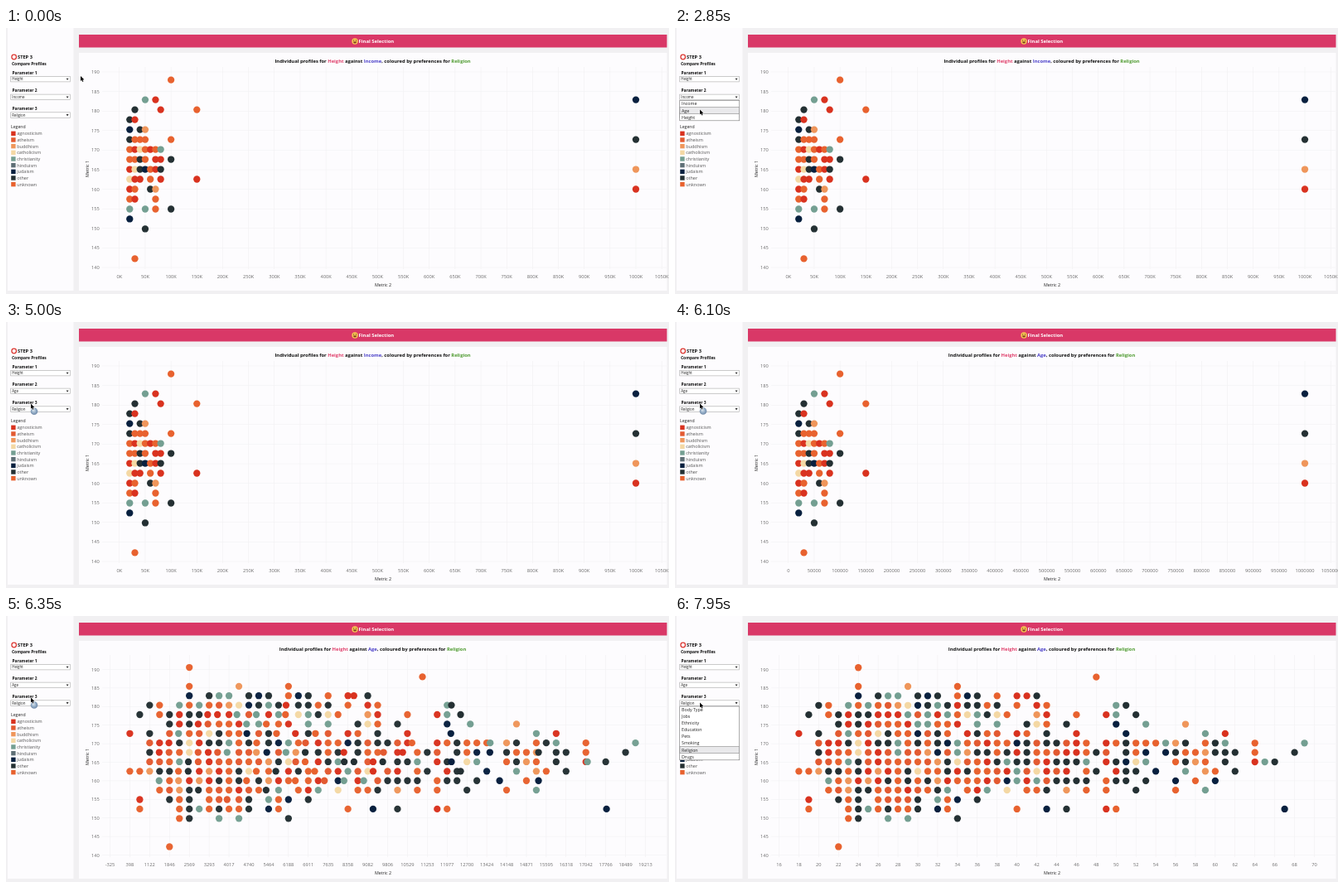
An HTML page with a canvas for the animation above (8000 ms loop, 800 by 321 pixels).

```html
<!DOCTYPE html>
<html lang="en">
<head>
<meta charset="utf-8">
<title>Compare profiles</title>
<style>
html, body { margin: 0; width: 100%; height: 100%; overflow: hidden; background: #f1f0f2; }
canvas { display: block; width: 800px; height: 321px; }
</style>
</head>
<body>
<canvas id="stage"></canvas>
<script>
const W = 800, H = 321, LOOP = 8000, STEP = 50;
const MORPH_AT = 6100, MORPH_MS = 300.3;
const FONT = '"Open Sans", "Noto Sans", sans-serif';
const canvas = document.getElementById('stage');
const ctx = canvas.getContext('2d');
const dpr = window.devicePixelRatio || 1;
canvas.width = W * dpr;
canvas.height = H * dpr;

const LEGEND = [
  ['a', 'agnosticism', '#d9321f'], ['t', 'atheism', '#e35a31'], ['b', 'buddhism', '#ef965b'],
  ['k', 'catholicism', '#f4d8a4'], ['c', 'christianity', '#749f92'], ['h', 'hinduism', '#5f6f76'],
  ['j', 'judaism', '#08203f'], ['o', 'other', '#243033'], ['u', 'unknown', '#e8622f'],
];
const COLOR = Object.fromEntries(LEGEND.map(([key, , color]) => [key, color]));

// Height in inches: [religion + income in K, religion + age or age runs].
// A capital marks a profile that is also in the income view.
const ROWS = {
  75: ['', 'u24'],
  74: ['u100', 'U48'],
  73: ['', 'u24 b29 u34'],
  72: ['c50 a70 j1000', 'j24 o26 c27 c28 o30 j31 o32 u34 j35 o36 u38 a40 A41 o42'],
  71: ['o30 a80 u150', 'o20 u21 c23 u24 c25 26-28 k29 30-35 o36 u37 o38 u40 a42 u43 c50 O51'],
  70: ['o20 a30', 'o19 u21 o22 a23 24-36 o37 k38 u39 b42 a43 u46 a49 c50 O52'],
  69: ['j20 o40 b50', 'o22 a23 o24 25-34 c36 c38 o41 k42 u43 o45 j50 C53 b57'],
  68: ['o20 u30 u40 u50 u100 o1000', 'a18 o20 22-33 35-38 a40 u41 o43 a46 J51 c59 a61'],
  67: ['u20 a30 k40 u50 a60 u70 c80', '20-47 a49 u50 o51 u52 u53 u54 C55 b56 o57 u59 o60 c61 u64 c69'],
  66: ['u20 u30 o40 u50 a70 a80 o100', '20-49 o51 u52 j53 J55 o56 u57 u58 b59 O60 o61 o62 u64 o68'],
  65: ['a20 k30 o40 j50 u60 a70 o80 b1000', '20-47 a49 o50 J51 k52 c53 u56 o57 b58 u59 o61 a64 C65 o66'],
  64: ['k20 a30 a40 u60 a80 a150', 'u18 u19 20-45 u47 o48 a50 o51 O52 j54 c57 b59 u60 o62'],
  63: ['a20 u30 o60 b70 a1000', '21-43 o44 o45 o46 o47 u49 o50 o51 o53 J56 u58 J60'],
  62: ['u20 a30 u70', 'u21 22-33 35-37 k39 u41 u42 o43 b45 u47 u49 o52 u56 c59'],
  61: ['c20 c50 u70 o100', 'a19 o22 u23 o24 26-30 c32 u33 j34 o36'],
  60: ['j20', 'u19 u23 o24 c25 u26 o27 u28 u29 o30 j32 u33 u40 J43 o45 a49 u50 J67'],
  59: ['o50', 'u23 o24 c27 c29 o34'],
  56: ['u30', 'u22'],
};
const LISTS = {
  2: { top: 87.5, items: ['Income', 'Age', 'Height'] },
  3: { top: 109, items: ['Body Type', 'Jobs', 'Ethnicity', 'Education', 'Pets', 'Smoking', 'Religion', 'Drugs'] },
};
const PATH = [
  [0, 90, 58], [150, 90, 58], [350, 31, 91], [600, 31, 91], [1000, 32, 83.5],
  [2450, 32, 83.5], [2900, 30, 99], [6500, 30, 98.5], [6900, 30, 104.5], [LOOP, 30, 104.5],
];

const lerp = (a, b, k) => a + (b - a) * k;
const ease = u => u < .5 ? 4 * u ** 3 : 1 - 4 * (1 - u) ** 3;
const incomeX = k => 136.8 + k * .6232;
const incomeY = cm => 289 - (cm - 140) * 4.72;
const ageX = age => 125.5 + (age - 16) * 11.963;
const ageY = cm => 288.5 - (cm - 140) * 4.48;

let seed = 41;
function rnd() {
  seed = (seed * 1664525 + 1013904223) % 4294967296;
  return seed / 4294967296;
}

function pickReligion(age) {
  const pool = age < 38 ? 'uuuuuuttttaaaaoooocckjb' : 'uuuttaaaooooooojjcckb';
  return pool[Math.floor(rnd() * pool.length)];
}

function parse(text) {
  const out = [];
  for (const [, key, from, to] of text.matchAll(/([a-z]?)(\d+)(?:-(\d+))?/gi))
    for (let n = +from; n <= +(to || from); n++) out.push({ key, n });
  return out;
}

const incomeDots = [], ageDots = [];
for (const inch of Object.keys(ROWS)) {
  const cm = inch * 2.54;
  const [incomes, ages] = ROWS[inch].map(parse);
  for (const { key, n } of incomes)
    incomeDots.push({ x: incomeX(n), y: incomeY(cm), color: COLOR[key] });
  for (const { key, n } of ages) {
    const known = key ? key !== key.toLowerCase() : rnd() < .3;
    const near = incomes.filter(d => d.n < 1000);
    const start = known && near.length ? near[Math.floor(rnd() * near.length)] : null;
    ageDots.push({
      x: ageX(n), y: ageY(cm), oldY: incomeY(cm),
      oldX: start && incomeX(start.n),
      color: COLOR[key.toLowerCase() || pickReligion(n)],
    });
  }
}

function rect(x, y, w, h, fill, stroke) {
  if (fill) { ctx.fillStyle = fill; ctx.fillRect(x, y, w, h); }
  if (stroke) { ctx.strokeStyle = stroke; ctx.lineWidth = .6; ctx.strokeRect(x, y, w, h); }
}

function disc(x, y, r, fill) {
  ctx.fillStyle = fill;
  ctx.beginPath();
  ctx.arc(x, y, r, 0, Math.PI * 2);
  ctx.fill();
}

function text(str, x, y, size, color, { bold = false, align = 'left' } = {}) {
  ctx.font = `${bold ? 'bold ' : ''}${size}px ${FONT}`;
  ctx.fillStyle = color;
  ctx.textAlign = align;
  ctx.textBaseline = 'alphabetic';
  ctx.fillText(str, x, y + size * .36);
}

function poly(points, fill, stroke) {
  ctx.beginPath();
  points.forEach(([x, y]) => ctx.lineTo(x, y));
  ctx.closePath();
  if (stroke) { ctx.strokeStyle = stroke; ctx.lineWidth = 1; ctx.stroke(); }
  ctx.fillStyle = fill;
  ctx.fill();
}

function drawBanner() {
  rect(88, 8, 709.5, 15.5, '#d93867');
  disc(421, 16, 3.7, '#f6c552');
  disc(419.6, 14.9, .6, '#6b4320');
  disc(422.4, 14.9, .6, '#6b4320');
  ctx.fillStyle = '#7a3b1d';
  ctx.beginPath();
  ctx.arc(421, 16.5, 2, 0, Math.PI);
  ctx.fill();
  text('Final Selection', 425.5, 16, 5.9, '#fff', { bold: true });
}

function drawTitle(metric) {
  const parts = [
    ['Individual profiles for ', '#111'], ['Height', '#e0406c'], [' against ', '#111'],
    [metric, '#4a3fc8'], [', coloured by preferences for ', '#111'], ['Religion', '#4d9a2e'],
  ];
  ctx.font = `bold 5.8px ${FONT}`;
  const widths = parts.map(p => ctx.measureText(p[0]).width);
  let x = 442.5 - widths.reduce((a, b) => a + b) / 2;
  parts.forEach(([str, color], i) => {
    text(str, x, 40.3, 5.8, color, { bold: true });
    x += widths[i];
  });
}

function drawAxes(t, e) {
  const morphed = t > MORPH_AT;
  const label = { align: 'center' };
  const xs = [], ys = [];
  if (morphed) {
    for (let age = 16; age <= 70; age += 2) {
      const x = ageX(age), before = (x - 136.8) / .6232 * 1000;
      xs.push([x, Math.round(lerp(before, age, e))]);
    }
  } else {
    for (let k = 0; k <= 1050; k += 50)
      xs.push([incomeX(k), t < MORPH_AT ? k + 'K' : k * 1000]);
  }
  for (let cm = 140; cm <= 190; cm += 5) {
    const y = morphed ? ageY(cm) : incomeY(cm);
    const before = 140 + (289 - y) / 4.72;
    ys.push([y, morphed ? Math.round(lerp(before, cm, e)) : cm]);
  }
  for (const [x, str] of xs) {
    rect(x - .25, 47, .5, 244, '#efeef0');
    text(String(str), x, 299.7, 5.7, '#6c6c6c', label);
  }
  for (const [y, str] of ys) {
    rect(116, y - .25, 681, .5, '#efeef0');
    text(String(str), 112.8, y, 5.7, '#6c6c6c', { align: 'right' });
  }
  text('Metric 2', 455, 310.5, 5.3, '#222', label);
  ctx.save();
  ctx.translate(98, 170);
  ctx.rotate(-Math.PI / 2);
  text('Metric 1', 0, 0, 5.3, '#222', label);
  ctx.restore();
}

function drawDots(t, e) {
  const r = 4.15;
  if (t <= MORPH_AT) {
    incomeDots.forEach(d => disc(d.x, d.y, r, d.color));
    return;
  }
  for (const d of ageDots) {
    const y = lerp(d.oldY, d.y, e);
    ctx.globalAlpha = d.oldX === null ? e : 1;
    disc(d.oldX === null ? d.x : lerp(d.oldX, d.x, e), y, r, d.color);
  }
  ctx.globalAlpha = 1;
}

function drawSelect(index, value, hot) {
  const y = 58.4 + (index - 1) * 21.7;
  text('Parameter ' + index, 7.5, y - 4.5, 4.9, '#111', { bold: true });
  rect(5.7, y, 71.8, 6.5, '#fff', hot ? '#444' : '#aaa');
  text(value, 7.2, y + 3.3, 4.4, '#222');
  poly([[72.6, y + 2.3], [75.6, y + 2.3], [74.1, y + 4.6]], '#333');
}

function drawList({ top, items }, active) {
  const rowH = 8.1;
  rect(5.7, top, 72, items.length * rowH, '#fff', '#777');
  items.forEach((item, i) => {
    const y = top + i * rowH;
    if (i === active) rect(5.9, y, 71.6, rowH, '#e9e9eb', '#8a8a8a');
    text(item, 8, y + rowH / 2, 5.3, '#222');
  });
}

function drawSidebar(t, tipY) {
  rect(2, 0, 79.5, 317, '#fdfcfe');
  ctx.strokeStyle = '#dc3b35';
  ctx.lineWidth = 1.3;
  ctx.beginPath();
  ctx.arc(9.7, 35, 2.8, 0, Math.PI * 2);
  ctx.stroke();
  text('STEP 3', 14, 35, 5.7, '#111', { bold: true });
  text('Compare Profiles', 7, 43, 4.9, '#111', { bold: true });

  const secondOpen = t >= 2300 && t < 4700;
  const thirdOpen = t >= 7400;
  drawSelect(1, 'Height');
  drawSelect(2, t < 4700 ? 'Income' : 'Age', t >= 600 && t < 2300);
  drawSelect(3, 'Religion', t >= 6900 && !thirdOpen);

  text('Legend', 6, 119.2, 5.2, '#222');
  LEGEND.forEach(([, name, color], i) => {
    const y = 127.3 + i * 7.67;
    rect(6.2, y - 2.7, 5.4, 5.4, color);
    text(name, 13.2, y, 5.5, '#555');
  });
  if (secondOpen) drawList(LISTS[2], tipY > 95 ? 1 : 0);
  if (thirdOpen) drawList(LISTS[3], 6);
}

function cursorAt(t) {
  const i = PATH.findIndex((p, n) => n > 0 && t <= p[0]);
  const [t0, x0, y0] = PATH[i - 1], [t1, x1, y1] = PATH[i];
  const u = (t - t0) / (t1 - t0), k = u * u * (3 - 2 * u);
  return [lerp(x0, x1, k), lerp(y0, y1, k)];
}

function drawCursor(t, x, y) {
  if (t >= 4900 && t < 6700) {
    const ball = ctx.createRadialGradient(x + 3, y + 7.5, .5, x + 4, y + 9, 4.4);
    ball.addColorStop(0, '#d3dfe9');
    ball.addColorStop(.6, '#8ea9c4');
    ball.addColorStop(1, '#7188a6');
    disc(x + 4, y + 9, 4.3, ball);
  }
  const shape = [[0, 0], [0, 6], [1.4, 4.8], [2.4, 7], [3.4, 6.5], [2.5, 4.4], [4.3, 4.2]];
  poly(shape.map(([a, b]) => [x + a, y + b]), '#000', '#fff');
}

function draw(t) {
  const e = ease(Math.min(1, Math.max(0, (t - MORPH_AT) / MORPH_MS)));
  const [cx, cy] = cursorAt(t);
  ctx.setTransform(dpr, 0, 0, dpr, 0, 0);
  rect(0, 0, W, H, '#f1f0f2');
  drawBanner();
  rect(88, 30, 709.5, 287, '#fdfcfe');
  drawTitle(t < MORPH_AT ? 'Income' : 'Age');
  drawAxes(t, e);
  drawDots(t, e);
  drawSidebar(t, cy);
  drawCursor(t, cx, cy);
}

function tick() {
  const t = performance.now() % LOOP;
  draw(Math.floor(t / STEP) * STEP);
  requestAnimationFrame(tick);
}
tick();
</script>
</body>
</html>
```
